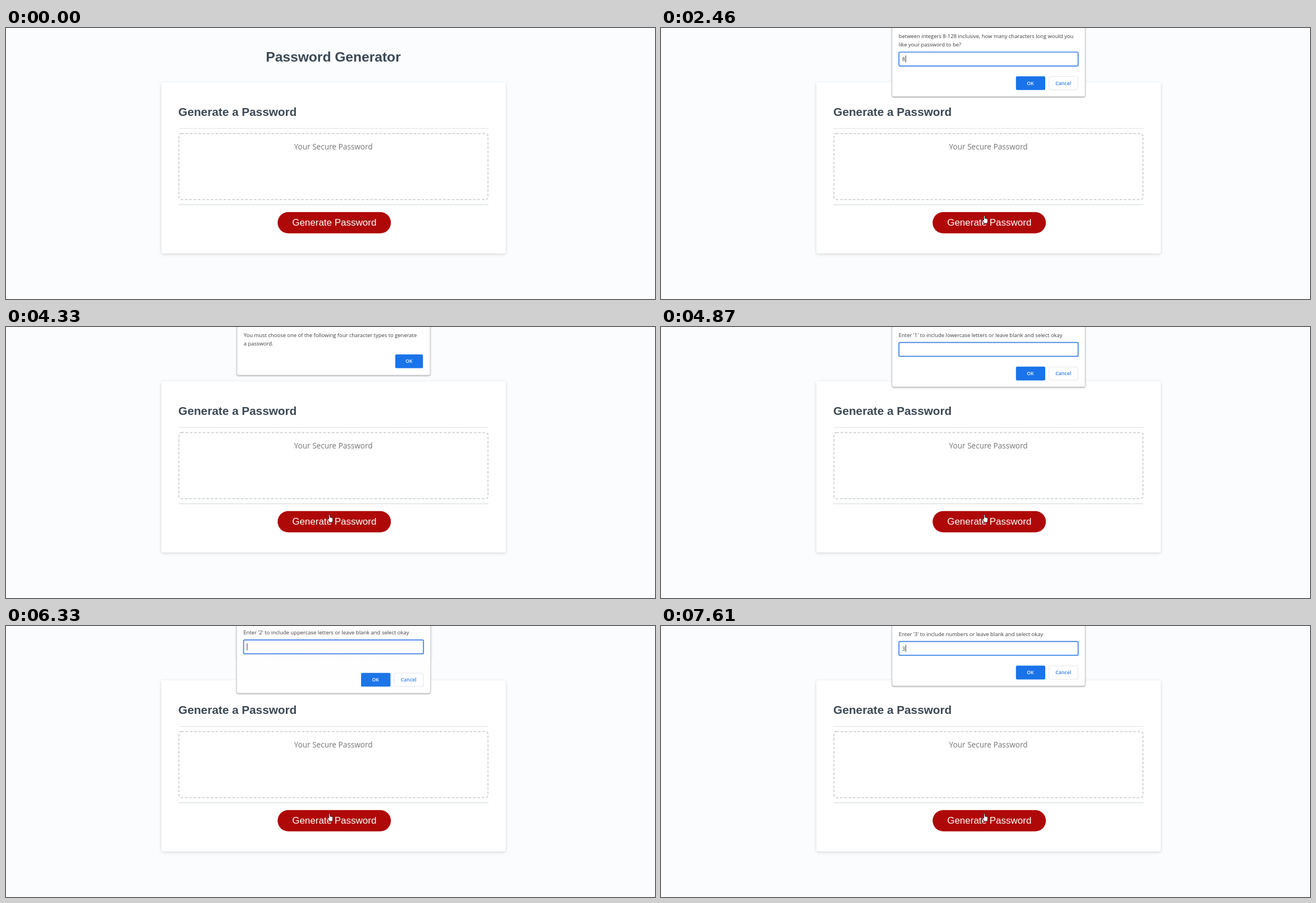
Animation of 1157x484 px, one loop 8 s. Source, as an HTML page:

```html
<!DOCTYPE html>
<html lang="en">
<head>
<meta charset="utf-8">
<title>Password Generator</title>
<style>
html, body { margin: 0; width: 100%; height: 100%; overflow: hidden; background: #fafcfe; }
svg { display: block; width: 1157px; height: 484px; }
.page { font-family: "Liberation Sans", Arial, sans-serif; }
.head { font-weight: bold; fill: #3b4854; }
.ui { font-family: "Open Sans", "Noto Sans", sans-serif; }
.msg { font-size: 9.44px; fill: #3c3d40; }
.btn { font-size: 8.7px; font-weight: 600; text-anchor: middle; }
</style>
</head>
<body>
<svg viewBox="0 0 1157 484" xmlns="http://www.w3.org/2000/svg">
  <defs>
    <filter id="cardShade" x="-5%" y="-5%" width="110%" height="112%">
      <feDropShadow dx="0" dy="1.5" stdDeviation="2.6" flood-opacity=".17"/>
    </filter>
    <filter id="boxShade" x="-5%" y="-10%" width="110%" height="120%">
      <feDropShadow dx="0" dy="1" stdDeviation="1.2" flood-opacity=".42"/>
    </filter>
  </defs>
  <rect width="1157" height="484" fill="#fafcfe"/>
  <g class="page">
    <text class="head" x="583.5" y="59.5" font-size="24.58" text-anchor="middle">Password Generator</text>
    <rect x="277" y="97" width="614" height="305.5" rx="3.8" fill="#fff" filter="url(#cardShade)"/>
    <text class="head" x="307.3" y="156.5" font-size="20.74">Generate a Password</text>
    <rect x="307.5" y="178.7" width="552.5" height="1.5" fill="#e8e8e8"/>
    <rect x="308.3" y="188.6" width="551" height="118" rx="4.2" fill="#fff" stroke="#c5c7ca" stroke-width="1.5" stroke-dasharray="4.6 3.07"/>
    <text class="ui" x="583.6" y="216.8" font-size="13.6" fill="#757575" text-anchor="middle">Your Secure Password</text>
    <rect x="307.5" y="314.5" width="552.5" height="2" fill="#e3e8ec"/>
    <rect x="484.2" y="328.8" width="202" height="38" rx="19" fill="#af0808"/>
    <text x="585.3" y="353.2" font-size="17" fill="#fff" text-anchor="middle">Generate Password</text>
  </g>
  <g id="dialogs" class="ui"></g>
  <g id="cursor" fill="#fff" stroke="#111" stroke-width=".8" stroke-linejoin="round">
    <path id="arrow" d="M.4 .6V12.2L3.1 9.7L4.9 13.6L6.7 12.8L5 9H8.6Z"/>
    <path id="hand" d="M3 1.6Q3 .5 4 .5T5 1.6V5.6Q5.9 5 6.6 5.9Q7.6 5.3 8.3 6.3Q9.8 5.9 10 7.4V10.5Q9.8 12.5 9 14.5H4.2Q2.6 11.5 .6 9.3Q.2 8 1.4 7.9Q2.3 8.1 3 9Z"/>
  </g>
</svg>
<script>
const LOOP = 8000, LINE = 15.4, BLUE = "#1a73e8";
const $ = id => document.getElementById(id);

// Window poses while opening and closing
const REST = { a: 1, dy: 0, s: 1 };
const NEAR = { a: .94, dy: -4.3, s: 1.006 };
const LEAVE = { a: .98, dy: -4.3, s: 1.006 };
const ARRIVE = { a: .985, dy: -2.9, s: 1.004 };
const FAR = { a: .2, dy: -11.6, s: 1.017 };

const ask = (n, what) => ({ prompt: true, lines: [`Enter '${n}' to include ${what} or leave blank and select okay`] });
const thanks = what => ({ lines: [`Thank you, ${what} letters will be included.`] });

const askLength = { prompt: true, lines: [
  "between integers 8-128 inclusive, how many characters long would you",
  "like your password to be?"] };
const mustChoose = { lines: [
  "You must choose one of the following four character types to generate",
  "a password."] };
const askLower = ask(1, "lowercase letters");
const askUpper = ask(2, "uppercase letters");
const askNumber = ask(3, "numbers");
const thanksLower = thanks("lowercase"), thanksUpper = thanks("uppercase");

const steps = [{ at: 0, shown: [] }];
const step = (at, ...shown) => steps.push({ at, shown });
const view = (dialog, pose = REST, o = {}) => ({ dialog, pose, focus: true, caret: true, val: "", ...o });

// One dialog gives way to the next in four steps
function swap(at, from, to, val = "") {
  const old = { val, focus: false, caret: false };
  const moving = { ...old, tall: from.prompt };
  const tall = { tall: to.prompt };
  step(at, view(from, REST, old));
  step(at + 70, view(from, LEAVE, moving), view(to, FAR, tall));
  step(at + 130, view(from, FAR, moving), view(to, ARRIVE, tall));
  step(at + 200, view(to));
}
const type = (at, dialog, val) => step(at, view(dialog, REST, { val }));
const blink = (at, dialog, caret) => step(at, view(dialog, REST, { caret }));

step(1200, view(askLength, FAR));
step(1270, view(askLength, NEAR));
step(1330, view(askLength));
blink(1670, askLength, false);
blink(2200, askLength, true);
type(2460, askLength, "8");
swap(2725, askLength, mustChoose, "8");
swap(4330, mustChoose, askLower);
blink(4870, askLower, false);
blink(5400, askLower, true);
type(5600, askLower, "1");
swap(5870, askLower, thanksLower, "1");
swap(6200, thanksLower, askUpper);
type(6530, askUpper, "2");
swap(6940, askUpper, thanksUpper, "2");
swap(7270, thanksUpper, askNumber);
type(7610, askNumber, "3");

const rect = (x, y, w, h, r, attrs) => `<rect x="${x}" y="${y}" width="${w}" height="${h}" rx="${r}" ${attrs}/>`;
const label = (x, y, text, fill) => `<text class="btn" x="${x}" y="${y}" fill="${fill}">${text}</text>`;

function promptParts(v, extra, drop) {
  const y = 27.6 + extra, by = 70.8 + drop;
  const edge = v.focus ? 'stroke="#3a80e6" stroke-width="1.7"' : 'stroke="#e2e3e6" stroke-width="1"';
  const caretX = v.val ? 436.2 : 430.4;
  return rect(424.2, y, 319.4, 24.8, 2, `fill="none" ${edge}`) +
    `<text class="msg" x="429.8" y="${y + 15.9}" fill-opacity="${v.focus ? 1 : .7}">${v.val}</text>` +
    (v.caret ? `<rect x="${caretX - .4}" y="${y + 6}" width="1" height="12.6" fill="#333"/>` : "") +
    rect(632.8, by, 52.2, 24.6, 2.2, `fill="${BLUE}"`) + label(658.4, by + 15.4, "OK", "#fff") +
    rect(691.6, by + .4, 51.6, 23.8, 2.2, 'fill="#fff" stroke="#dfe1e5" stroke-width=".9"') +
    label(717.2, by + 15.4, "Cancel", "#2f7de9");
}

function alertParts(v, extra) {
  const y = 33.6 + extra;
  return rect(694, y, 49.3, 24.6, 2.2, `fill="${BLUE}"`) +
    (v.focus ? rect(693.4, y - .6, 50.5, 25.8, 2.8, `fill="none" stroke="${BLUE}" stroke-width="1.2"`) +
      rect(695.1, y + 1.1, 47.1, 22.4, 1.5, 'fill="none" stroke="#dbe8fc" stroke-width="1.2"') : "") +
    label(718.4, y + 15.4, "OK", "#fff");
}

function draw(v) {
  const { prompt, lines } = v.dialog, { a, dy, s } = v.pose;
  const extra = (lines.length - 1) * LINE;
  const drop = v.tall ? LINE : extra;
  const bottom = (prompt ? 107 : 70.6) + drop * (prompt || !v.tall ? 1 : 0);
  const text = lines.map((line, i) => `<text class="msg" x="423.8" y="${18 + i * LINE}">${line}</text>`).join("");
  return `<g opacity="${a}" transform="translate(584 ${dy}) scale(${s}) translate(-584 0)">` +
    rect(411.9, -50, 344.2, bottom + 50, 3, 'fill="#fff" stroke="#bfc1c4" stroke-width=".7" filter="url(#boxShade)"') +
    text + (prompt ? promptParts(v, extra, drop) : alertParts(v, extra)) + "</g>";
}

// Time, x, y of the hand once it is on the button
const handPath = [
  [660, 580, 338], [800, 579, 338], [1000, 577, 339], [1070, 574, 339], [1140, 571, 340],
  [1200, 570, 340], [1400, 571, 338], [1470, 572, 336], [1540, 572.5, 334.5]
];
const latest = (list, test) => list.filter(test).pop();

function moveCursor(t) {
  let x, y;
  if (t < 660) {
    const k = Math.floor((t - 120) / 67.5) / 8;
    const p = Math.sin(Math.max(k, 0) * Math.PI / 2);
    x = 1070 - 486 * p;
    y = 462 - 124 * p;
  } else {
    [, x, y] = latest(handPath, h => t >= h[0]);
  }
  const onButton = t >= 660 || (x < 684 && y < 366);
  if (t < 660 && onButton) x -= 4;
  $("cursor").setAttribute("visibility", t < 120 ? "hidden" : "visible");
  $("cursor").setAttribute("transform", `translate(${x} ${y})`);
  $("arrow").setAttribute("display", onButton ? "none" : "inline");
  $("hand").setAttribute("display", onButton ? "inline" : "none");
}

let current;
function render(t) {
  const now = latest(steps, s => t >= s.at);
  if (now !== current) {
    current = now;
    $("dialogs").innerHTML = now.shown.map(draw).join("");
  }
  moveCursor(t);
}

const start = performance.now();
function tick() {
  render((performance.now() - start) % LOOP);
  requestAnimationFrame(tick);
}
tick();
</script>
</body>
</html>
```
